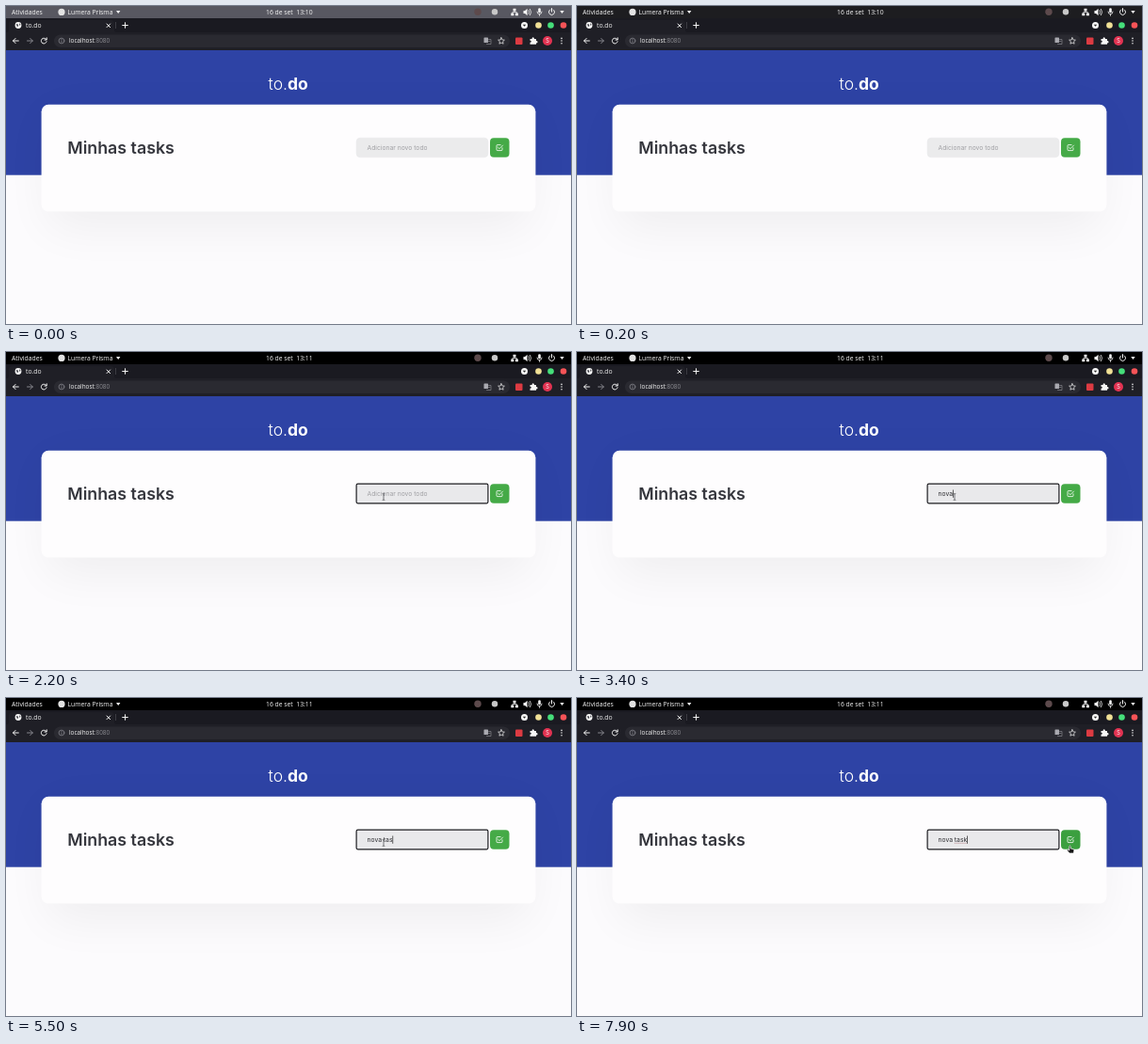
Animation of 600x338 px, one loop 8000 ms. Source, as an HTML page:

```html
<!DOCTYPE html>
<html lang="pt">
<head>
<meta charset="utf-8">
<title>to.do</title>
<style>
html, body { margin: 0; height: 100%; overflow: hidden; background: #fcfbfd; }
svg { display: block; width: 600px; height: 338px; }
text { white-space: pre; }
.ui { font: 500 6.8px "Open Sans", "Noto Sans", sans-serif; fill: #f6f6f6; }
.page { font-family: Inter, sans-serif; }
.line { fill: none; stroke: #f4f4f4; stroke-linecap: round; stroke-linejoin: round; }
.dim { stroke: #85858c; }
.tick { stroke: #fff; }
.small { font-size: 6.4px; }
</style>
</head>
<body>
<svg viewBox="0 0 600 338">
  <defs>
    <filter id="blur" x="-30%" y="-100%" width="160%" height="300%"><feGaussianBlur stdDeviation="25"/></filter>
  </defs>

  <!-- desktop panel -->
  <rect id="panel" width="600" height="13"/>
  <g class="ui">
    <text x="6" y="8.8">Atividades</text>
    <circle cx="59" cy="6.4" r="3.6" fill="#e2e2e2"/>
    <text x="65.5" y="8.8">Lumera Prisma</text>
    <path d="M117 5h4.4l-2.2 3z"/>
    <text id="clock" x="276" y="8.8"></text>
    <circle cx="501" cy="6.3" r="3.7" fill="#5d4a4c"/>
    <circle cx="519" cy="6.3" r="3.2" fill="#c8c8c8"/>
    <path d="M538.5 2.8h3v2.6h-3zM536.3 7.6h3v2.6h-3zM540.9 7.6h3v2.6h-3z"/>
    <path class="line" stroke-width=".7" d="M540 5v1.5M537.8 8v-1.5h4.6V8"/>
    <path d="M549.5 5h1.7l2.3-2.2v7.4l-2.3-2.2h-1.7z"/>
    <path class="line" stroke-width=".8" d="M555 4.6q1.4 1.9 0 3.8M556.5 3.3q2.4 3.2 0 6.4"/>
    <rect x="565.2" y="2.3" width="2.6" height="5" rx="1.3"/>
    <path class="line" stroke-width=".8" d="M564 6q0 2.7 2.5 2.7T569 6M566.5 8.8v1.5"/>
    <path class="line" d="M577.7 4a3 3 0 1 0 3.6 0M579.5 2.6v3.4"/>
    <path d="M588.3 5h4.4l-2.2 3z"/>
  </g>

  <!-- browser -->
  <rect y="13" width="600" height="15" fill="#1a1a21"/>
  <rect y="28" width="600" height="19" fill="#1f1f26"/>
  <path d="M1 28q2 0 2-3v-6q0-4 4-4h104q4 0 4 4v6q0 3 2 3z" fill="#1f1f26"/>
  <rect x="51" y="30.5" width="484" height="13.5" rx="6.75" fill="#2a2a31"/>
  <g class="ui">
    <circle cx="13" cy="20.5" r="3.4"/>
    <path d="M10.8 19l2 .4.4 1.5-1.3 1.3zM14 18.3l1.6 1.4-1.2 1.2z" fill="#44454c"/>
    <text x="21" y="23">to.do</text>
    <path class="line" d="M107 19l3.6 3.6m0-3.6L107 22.6M123.7 20.5h5.6M126.5 17.7v5.6"/>
    <path d="M116.5 17v7" stroke="#55555b" stroke-width=".6"/>
    <circle cx="550.5" cy="20.5" r="3.5"/>
    <path d="M548.8 19.7h3.4l-1.7 2z" fill="#222"/>
    <circle cx="565.5" cy="20.5" r="3.3" fill="#f0e096"/>
    <circle cx="578.5" cy="20.5" r="3.3" fill="#45de7a"/>
    <circle cx="592" cy="20.5" r="3.3" fill="#f65357"/>
    <path class="line" d="M13.3 37H7.5m2.6-2.6L7.5 37l2.6 2.6"/>
    <path class="line dim" d="M22.5 37h5.8m-2.6-2.6L28.3 37l-2.6 2.6"/>
    <path class="line" d="M42.6 35.3a2.9 2.9 0 1 0 .5 2.5M43.2 33.8v2.2H41"/>
    <circle class="line dim" cx="59" cy="37" r="2.9" stroke-width=".8"/>
    <path class="line dim" stroke-width=".8" d="M59 36.9v1.5M59 35.5v.1"/>
    <text class="small" x="67" y="39.3">localhost<tspan fill="#8c8c92">:8080</tspan></text>
    <rect x="507.5" y="33.5" width="4.5" height="5.5" rx=".6" fill="#a9a9b0"/>
    <path class="line dim" stroke-width=".7" d="M512.5 35.5h2.5v5h-4.5M512 37.5h2"/>
    <path class="line" stroke-width=".7" d="M526 33.7l1 2.2 2.4.3-1.8 1.6.5 2.4-2.1-1.2-2.1 1.2.5-2.4-1.8-1.6 2.4-.3z"/>
    <rect x="541" y="33.5" width="7.5" height="7.5" rx="1" fill="#dc3b42"/>
    <path d="M556.5 35h2q0-1.7 1.2-1.7T561 35h2v2q1.6 0 1.6 1.2T563 39.4v1.4h-6.5v-2q1.3-.2 1.3-1t-1.3-1z"/>
    <circle cx="575" cy="37" r="5" fill="#e23352"/>
    <text class="small" x="575" y="39.3" text-anchor="middle">S</text>
    <path class="line" stroke-width="1.5" d="M590 34.3v.1m0 2.6v.1m0 2.6v.1"/>
  </g>

  <!-- page -->
  <rect y="47" width="600" height="132.7" fill="#2e43a5"/>
  <rect x="45" y="116" width="510" height="120" rx="8" opacity=".05" filter="url(#blur)"/>
  <rect x="37.6" y="104.7" width="524.8" height="113.8" rx="7.5" fill="#fefdfe"/>
  <g class="page">
    <text x="278.6" y="89" font-size="17.5" font-weight="350" fill="#fff">to.<tspan font-weight="700">do</tspan></text>
    <text x="65.3" y="156.5" font-size="17.8" font-weight="600" fill="#36373e">Minhas tasks</text>
    <rect id="field" x="372.1" y="140.2" width="139.8" height="20.6"/>
    <text id="entry" x="383.5" y="152.6" font-size="6.75"></text>
    <path id="spell" stroke="#b07a80" stroke-width=".7" stroke-dasharray="1.4 .7"/>
    <rect id="caret" y="146.5" width=".7" height="8.3" fill="#222"/>
  </g>
  <rect id="button" x="514" y="140.3" width="20.5" height="20.5" rx="4"/>
  <path class="line tick" stroke-width=".8" d="M522.6 150.3l1.4 1.4 3.5-3.6M527 150.8v2a.8.8 0 0 1-.8.8h-4.4a.8.8 0 0 1-.8-.8v-4.4a.8.8 0 0 1 .8-.8h3.3"/>

  <g id="pointer">
    <path id="beam" d="M-1.3-3.5Q0-3.5 0-2.7Q0-3.5 1.3-3.5M0-2.7V2.7M-1.3 3.5Q0 3.5 0 2.7Q0 3.5 1.3 3.5" fill="none" stroke="#44454a" stroke-width=".7"/>
    <path id="arrow" d="M0 0v7l1.6-1.5 1.1 2.5 1.2-.5-1.1-2.4h2.2z" fill="#161616" stroke="#fff" stroke-width=".6"/>
    <path id="hand" d="M-.7.6Q0-.5.7.6V3l3 .7q.8.2.7 1.2L3.9 8H-.6L-3 4.9q-.2-1.3 1-.8l1.3.9z" fill="#161616" stroke="#fff" stroke-width=".7"/>
  </g>
</svg>
<script>
const $ = id => document.getElementById(id);
const LOOP = 8000, STEP = 100;

// [time, x, y]
const path = [
  [0, 152, 151], [200, 152, 151], [400, 205, 158], [600, 335, 168], [800, 387, 163.5],
  [1000, 388, 164], [1300, 401, 154], [6800, 401, 154], [7000, 412, 161],
  [7200, 452, 166], [7500, 512, 164], [7700, 523.5, 157], [LOOP, 523.5, 157]
];
// [time, field text]
const edits = [
  [1600, ''], [2800, 'n'], [2900, 'no'], [3200, 'nov'], [3400, 'nova'], [3500, 'nova '],
  [3800, 'nova t'], [4700, 'nova ta'], [5500, 'nova tas'], [6300, 'nova task']
];

const show = (id, on) => $(id).style.display = on ? '' : 'none';
const paint = (id, attrs) => {
  for (const name in attrs) $(id).setAttribute(name, attrs[name]);
};
const inside = (x, y, left, top, right, bottom) =>
  x > left && x < right && y > top && y < bottom;

function position(t) {
  const i = path.findIndex(p => p[0] > t);
  const [t0, x0, y0] = path[i - 1], [t1, x1, y1] = path[i];
  const k = (t - t0) / (t1 - t0);
  return [x0 + (x1 - x0) * k, y0 + (y1 - y0) * k];
}

function textWidth(text) {
  $('entry').textContent = text;
  return text ? $('entry').getComputedTextLength() : 0;
}

function drawPanel(t) {
  const light = 88 * Math.exp(-t / 180);
  paint('panel', { fill: `rgb(${light} ${light} ${light * 1.1})` });
  $('clock').textContent = t < 1000 ? '16 de set  13:10' : '16 de set  13:11';
}

function drawField(t) {
  const focused = t >= 1500;
  paint('field', {
    fill: focused ? '#e9e9eb' : '#ebebec',
    stroke: focused ? '#1c1c20' : '#e6e6e8',
    'stroke-width': focused ? 1.2 : .5,
    rx: focused ? 1.5 : 4
  });

  const [since, text] = edits.filter(e => e[0] <= t).pop() || [Infinity, ''];
  const start = 383.5 + textWidth('nova '), end = 383.5 + textWidth(text);
  paint('spell', { d: `M${start} 154.3H${end}` });
  show('spell', t >= 6900);
  paint('caret', { x: end });
  show('caret', t >= since && (t - since) % 1100 < 600);
  $('entry').textContent = text || 'Adicionar novo todo';
  paint('entry', { fill: text ? '#2c2c30' : '#a0a0a4' });
}

function drawPointer(t) {
  const [x, y] = position(t);
  const onButton = inside(x, y, 514, 140, 535, 161);
  const onText = inside(x, y, 65, 141, 179, 160) || inside(x, y, 372, 140, 512, 161);
  paint('pointer', { transform: `translate(${x} ${y})` });
  show('beam', onText);
  show('hand', onButton);
  show('arrow', !onText && !onButton);
  paint('button', { fill: onButton ? '#3b9f3f' : '#45aa47' });
}

function draw(now) {
  const t = Math.floor(now % LOOP / STEP) * STEP;
  drawPanel(t);
  drawField(t);
  drawPointer(t);
  requestAnimationFrame(draw);
}
draw(performance.now());
</script>
</body>
</html>
```
